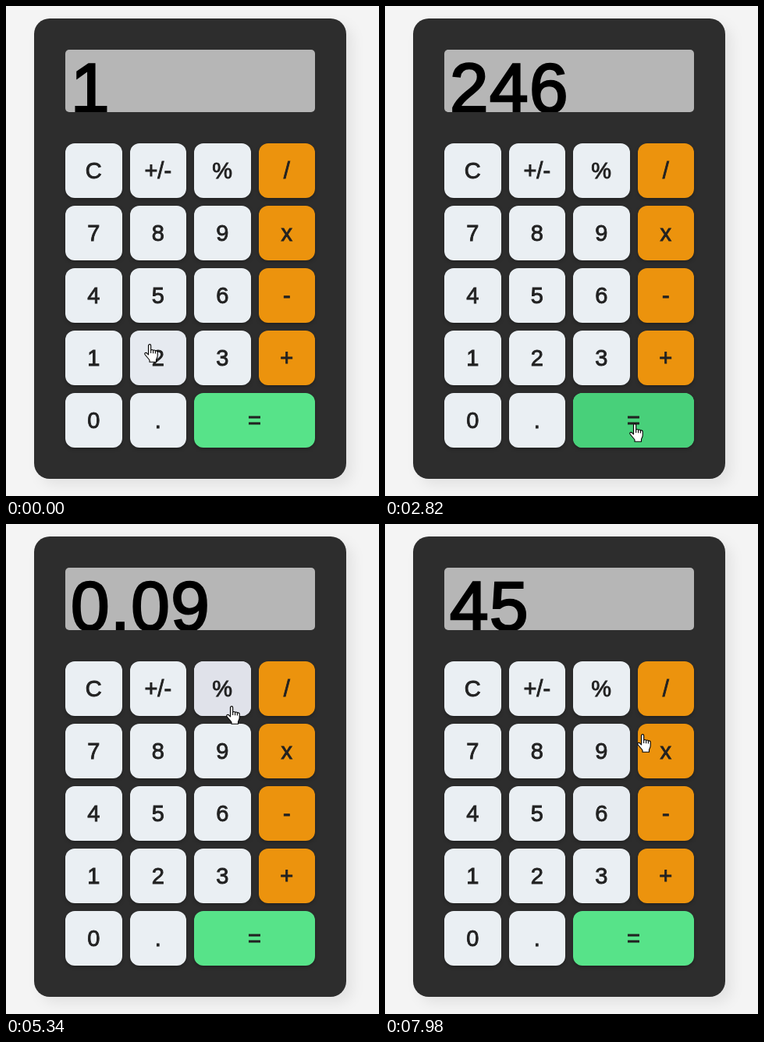
Animation, 478 px wide and 628 px high, one loop 8 s. Source, as an HTML page:

```html
<!DOCTYPE html>
<html lang="en">
<head>
<meta charset="utf-8">
<title>Calculator</title>
<style>
  html, body { margin: 0; width: 100%; height: 100%; overflow: hidden; background: #f4f4f4; }
  svg { display: block; width: 478px; height: 628px; }
  text { font-family: "Liberation Sans", Arial, sans-serif; }
  .body { fill: #2d2d2d; filter: drop-shadow(8px 8px 8px #00000012); }
  .key rect { filter: drop-shadow(0 2px 2px #0004); }
  .key text { font-size: 29px; text-anchor: middle; fill: #222; stroke: #222; stroke-width: .9; }
  #display { font-size: 89px; letter-spacing: 1.5px; stroke: #000; stroke-width: 2.6; }
  #cursor path { fill: #fff; stroke: #000; stroke-width: 1.1; stroke-linejoin: round; }
</style>
</head>
<body>
<svg viewBox="0 0 478 628">
  <clipPath id="screen"><rect x="76" y="56" width="320" height="80" rx="5"/></clipPath>
  <rect class="body" x="36" y="16" width="400" height="590" rx="20"/>
  <rect x="76" y="56" width="320" height="80" rx="5" fill="#b6b6b6"/>
  <g clip-path="url(#screen)"><text id="display" x="83" y="136"></text></g>
  <g id="keys"></g>
  <g id="cursor">
    <path id="arrow" d="M.5 .5V16.5L4.2 13 6.8 19.2 9.3 18.1 6.8 12.2H12Z"/>
    <g id="hand" transform="translate(-6)">
      <path d="M5.5 14V2.2a1.6 1.6 0 0 1 3.2 0V8.5c0-1.4 2.9-1.4 2.9.2 0-1 2.8-1 2.8.7 0-1 2.8-.8 2.8 1.2V15c0 3-1.7 4-1.7 5.5V23.3H7V21C5.5 18.5 2.5 16 1 13.5c-1-2 1.5-3 3-1.2Z"/>
      <path d="M8.7 8.5v3.5M11.6 9v3.2M14.4 9.6v3"/>
    </g>
  </g>
</svg>
<script>
const LOOP = 8000, STEP = 60, FADE = 180, TRAVEL = 240, REST = 120;
const $ = id => document.getElementById(id);

// Key colours as [normal, hovered]
const LIGHT = ['#eaeff3', '#e0e2ea'];
const ORANGE = ['#ec930d', '#e4820a'];
const GREEN = ['#57e389', '#48d07a'];

const rows = [['C', '+/-', '%', '/'], ['7', '8', '9', 'x'], ['4', '5', '6', '-'], ['1', '2', '3', '+'], ['0', '.', '=']];

function add(parent, tag, attrs) {
  const node = document.createElementNS('http://www.w3.org/2000/svg', tag);
  for (const name in attrs) node.setAttribute(name, attrs[name]);
  return parent.appendChild(node);
}

const keys = rows.flatMap((row, r) => row.map((label, c) => {
  const left = 76 + 82.5 * c, right = label === '=' ? 396 : left + 72.5;
  const x = Math.round(left), width = Math.round(right) - x, y = 176 + 80 * r;
  const center = [(left + right) / 2, y + 35];
  const [fill, hoverFill] = label === '=' ? GREEN : c === 3 ? ORANGE : LIGHT;
  const box = { x, y, width, height: 70, rx: 12 };
  const group = add($('keys'), 'g', { class: 'key' });
  add(group, 'rect', { ...box, fill });
  const glow = add(group, 'rect', { ...box, fill: hoverFill, style: 'filter: none' });
  add(group, 'text', { x: center[0], y: y + 45 }).textContent = label;
  return { label, x, y, width, center, glow };
}));

// Each press: key, time, and where on the key the pointer rests
const presses = [
  ['2', 240], ['3', 480], ['x', 900, -9, 0], ['2', 2040, -14, -25], ['=', 2640],
  ['C', 3780, 22, 8], ['9', 4560], ['%', 5100, 11, 22], ['C', 6180, 4, 13],
  ['4', 6780], ['5', 7320, 30, 20], ['x', 8130, -26, -28]
].map(([label, time, dx = 0, dy = 4]) => {
  const [x, y] = keys.find(key => key.label === label).center;
  return { label, time, x: x + dx, y: y + dy };
});

// Run the calculator once to learn what each press displays.
let text = '1', stored = 0, fresh = false;
for (const press of presses) {
  const { label } = press;
  if (/\d/.test(label)) text = fresh ? label : text + label;
  else if (label === 'x') stored = text;
  else if (label === '=') text = String(stored * text);
  else if (label === '%') text = String(text / 100);
  else text = '0';
  fresh = !/\d/.test(label);
  press.text = text;
}

// The pointer glides to each key and rests there shortly before pressing.
function pointerAt(t) {
  let x = 172, y = 410;
  for (const press of presses) {
    const u = Math.min(1, Math.max(0, (t - press.time + REST + TRAVEL) / TRAVEL));
    const eased = u * u * (3 - 2 * u);
    x += (press.x - x) * eased;
    y += (press.y - y) * eased;
  }
  return [x, y];
}

const inside = (key, [x, y]) => x >= key.x && x <= key.x + key.width && y >= key.y && y <= key.y + 70;

function draw(t) {
  const pointer = pointerAt(t);
  // Averaging recent positions gives each key a linear hover fade.
  const trail = Array.from({ length: 24 }, (_, i) => pointerAt(t - FADE * i / 24));
  for (const key of keys) key.glow.setAttribute('opacity', trail.filter(p => inside(key, p)).length / trail.length);
  const onKey = keys.some(key => inside(key, pointer));
  $('hand').style.display = onKey ? '' : 'none';
  $('arrow').style.display = onKey ? 'none' : '';
  $('cursor').setAttribute('transform', `translate(${pointer.map(Math.round)})`);
  $('display').textContent = presses.filter(press => press.time <= t).pop()?.text ?? '1';
}

const start = performance.now();
function tick() {
  const t = (performance.now() - start) % LOOP;
  draw(Math.floor(t / STEP) * STEP);
  requestAnimationFrame(tick);
}
tick();
</script>
</body>
</html>
```
